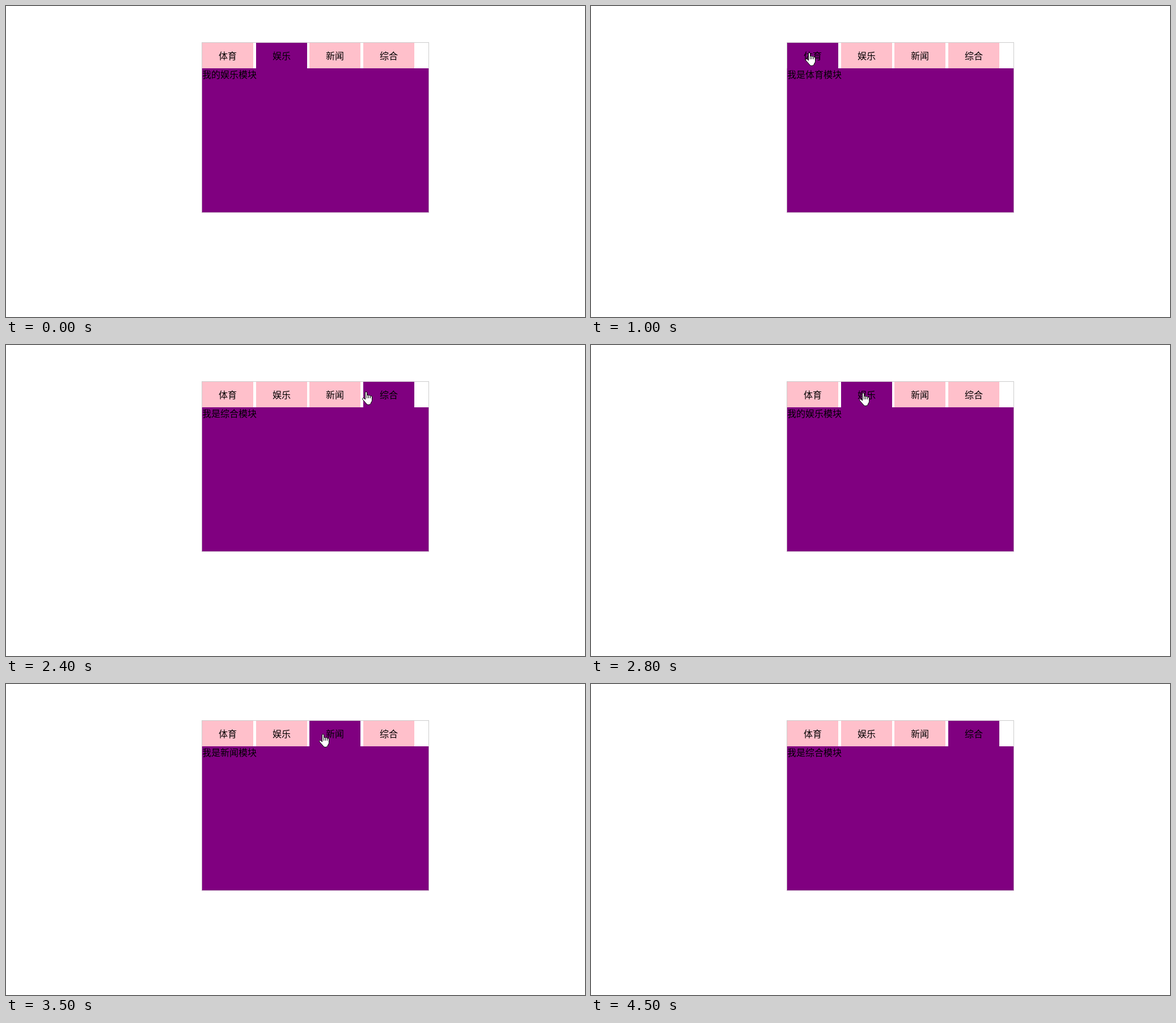
Recreate the animation shown at these times as an HTML page. Size 1021 by 549 pixels, loop 4900 ms.

```html
<!DOCTYPE html>
<html lang="zh-CN">
<head>
<meta charset="utf-8">
<title>选项卡</title>
<style>
  html, body { margin: 0; width: 100%; height: 100%; overflow: hidden; background: #fff; }
  body { position: relative; font: 350 16px "Noto Sans CJK SC", "Noto Sans CJK", sans-serif; color: #000; }
  .box { position: absolute; left: 345px; top: 64px; width: 399px; height: 299px; border: 1px solid #ccc; }
  .tab { position: absolute; top: 0; width: 90px; height: 45px; line-height: 45px; text-align: center; background: pink; }
  .tab.on, .panel { background: purple; }
  .panel { position: absolute; inset: 45px -1px -1px; border: 1px solid #bda3bd; border-top: 0; line-height: 21px; white-space: nowrap; }
  svg { position: absolute; left: 0; top: 0; width: 20px; height: 26px; overflow: visible; visibility: hidden; }
  path { fill: #fff; stroke: #000; stroke-width: 1; stroke-linejoin: round; }
</style>
</head>
<body>
<div class="box"><div class="panel"></div></div>
<svg id="arrow"><path d="M.5 .5V16.5L4.2 13L6.6 18.5L9 17.4L6.7 12H11.7Z"/></svg>
<svg id="hand">
  <path d="M5.5 14V2Q5.5 .5 7 .5T8.5 2V6.5Q10 5.3 11.5 7Q13.2 5.9 14.5 7.8Q17.5 7.2 17.5 10V15.5Q17.5 18 15.5 20V21Q14 23.5 11 23.5T7 21L1 14.2Q-.2 12.2 1.6 11.5Q3 11.2 5.5 14Z"/>
  <path d="M8.5 6.5V12M11.5 7V12M14.5 8V12" fill="none"/>
</svg>
<script>
const LOOP = 4900, STEP = 100, ENTER = 200, LEAVE = 4500;
const TAB_LEFT = 346, TAB_PITCH = 94.5, TAB_WIDTH = 90, TAB_TOP = 65, TAB_BOTTOM = 110;
const names = ['体育', '娱乐', '新闻', '综合'];
const texts = names.map((name, i) => `我${i === 1 ? '的' : '是'}${name}模块`);
const tabLeft = i => Math.round(TAB_LEFT + TAB_PITCH * i);

// Turning points of the pointer: time, x, y.
const turns = [
  [ENTER, 951, 235], [300, 839, 313], [500, 818, 311], [700, 441, 187],
  [800, 402, 86], [1000, 384, 82], [1200, 384, 82], [1300, 468, 84],
  [1400, 478, 85], [1500, 478, 85], [1800, 549, 81], [2100, 664, 81],
  [2200, 650, 80], [2300, 650, 80], [2400, 634, 82], [2800, 479, 84],
  [3100, 396, 88], [3500, 558, 88], [4000, 712, 76], [4100, 850, 52],
  [LEAVE, 1060, 20]
];

function pointerAt(time) {
  const next = turns.findIndex(turn => turn[0] > time);
  const [t0, x0, y0] = turns[next - 1], [t1, x1, y1] = turns[next];
  const part = (time - t0) / (t1 - t0);
  return { x: Math.round(x0 + (x1 - x0) * part), y: Math.round(y0 + (y1 - y0) * part) };
}

const hoveredTab = ({ x, y }) => y >= TAB_TOP && y < TAB_BOTTOM
  ? names.findIndex((_, i) => x >= tabLeft(i) && x < tabLeft(i) + TAB_WIDTH) : -1;

// The last tab hovered up to this time stays open.
function activeTab(time) {
  let active = 1;
  for (let t = ENTER; t <= time && t < LEAVE; t += STEP) {
    const hover = hoveredTab(pointerAt(t));
    if (hover >= 0) active = hover;
  }
  return active;
}

const box = document.querySelector('.box');
const panel = document.querySelector('.panel');
const arrow = document.getElementById('arrow');
const hand = document.getElementById('hand');
const tabs = names.map((name, i) => {
  const tab = document.createElement('div');
  tab.className = 'tab';
  tab.textContent = name;
  tab.style.left = tabLeft(i) - TAB_LEFT + 'px';
  return box.appendChild(tab);
});

function place(cursor, visible, x, y) {
  cursor.style.visibility = visible ? 'visible' : 'hidden';
  cursor.style.transform = `translate(${x}px, ${y}px)`;
}

function draw(time) {
  const active = activeTab(time);
  tabs.forEach((tab, i) => tab.classList.toggle('on', i === active));
  panel.textContent = texts[active];

  const visible = time >= ENTER && time < LEAVE;
  const pointer = visible ? pointerAt(time) : { x: 0, y: 0 };
  const hovering = hoveredTab(pointer) >= 0;
  place(arrow, visible && !hovering, pointer.x, pointer.y);
  place(hand, visible && hovering, pointer.x - 6, pointer.y);
}

const begin = performance.now();
let shown = -1;
function tick() {
  const elapsed = (performance.now() - begin) % LOOP;
  const time = Math.floor(elapsed / STEP) * STEP;
  if (time !== shown) draw(shown = time);
  requestAnimationFrame(tick);
}
tick();
</script>
</body>
</html>
```
